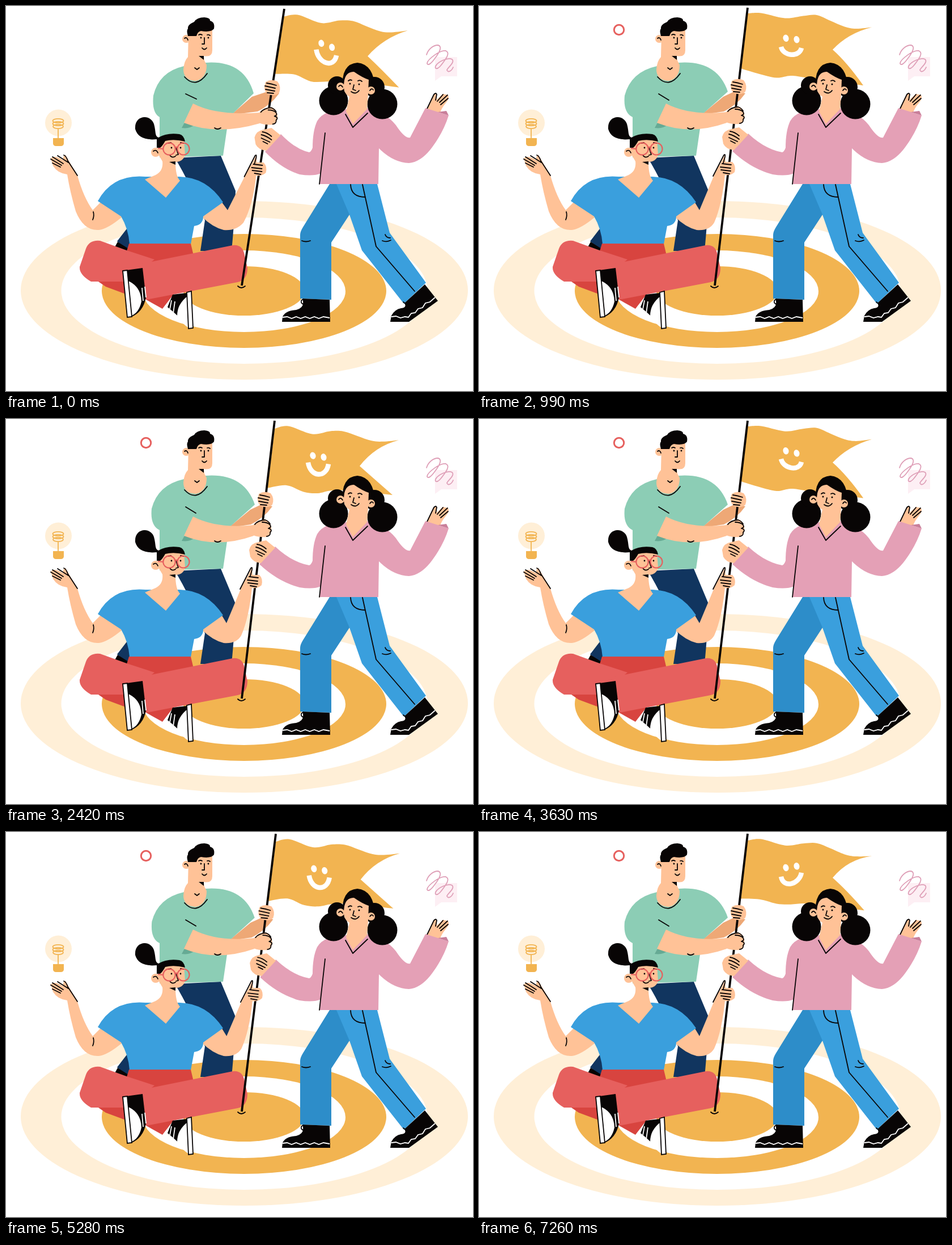
An HTML page for the animation above (7.37 s loop, 824x679 px).

```html
<!DOCTYPE html>
<html lang="en">
<head>
<meta charset="utf-8">
<title>Raising the flag</title>
<style>
html,body{margin:0;width:100%;height:100%;overflow:hidden;background:#fff}
svg{display:block;width:824px;height:679px}
.skin{fill:#ffc297}.tan{fill:#eea876}.gold{fill:#f2b451}.cream{fill:#ffefd7}
.green{fill:#8ccdb5}.navy{fill:#11355f}.blue{fill:#3a9fdd}.deep{fill:#2d8dc9}
.red{fill:#e6605e}.dark{fill:#d8443f}.pink{fill:#e4a0b6}.white{fill:#fff}.ink{fill:#080505}
.line{fill:none;stroke:#080505;stroke-width:1.8;stroke-linecap:round;stroke-linejoin:round}
.chalk{fill:none;stroke:#fff;stroke-width:1.8}
.rim{fill:none;stroke:#e6605e;stroke-width:2.2}
.wire{fill:none;stroke:#f2b451;stroke-width:1.8}
</style>
</head>
<body>
<svg viewBox="0 0 824 679">
  <!-- target -->
  <ellipse class="cream" cx="420.500" cy="501.500" rx="394.500" ry="157.500"/>
  <ellipse class="white" cx="420.500" cy="502" rx="323" ry="129"/>
  <ellipse class="gold" cx="420" cy="502.500" rx="251" ry="100.500"/>
  <ellipse class="white" cx="420" cy="503" rx="179" ry="72"/>
  <ellipse class="gold" cx="420" cy="502.500" rx="107" ry="43.500"/>

  <!-- bulb, ring, scribble -->
  <circle class="cream" cx="92.500" cy="206" r="23.500"/>
  <path class="gold" d="M83 233H102V243Q101 247 97 247H88Q84 247 83 243Z"/>
  <g class="wire">
    <ellipse cx="92" cy="202.500" rx="9.500" ry="3.600"/>
    <ellipse cx="92" cy="207.500" rx="9.500" ry="3.600"/>
    <ellipse cx="92" cy="212.500" rx="9" ry="3.600"/>
    <path d="M92 216V233"/>
  </g>
  <circle id="ring" cx="247" cy="42" r="8.700" fill="none" stroke="#e6605e" stroke-width="3"/>
  <path fill="#fdeff4" d="M757 90H796V124H768L757 132Z"/>
  <path fill="none" stroke="#dfa0b8" stroke-width="1.800" stroke-linecap="round" d="M742 86C745 76 754 69 762 69C771 71 764 83 757 92C750 102 744 106 743 101C744 94 766 77 776 79C785 83 775 95 768 104C762 112 756 112 758 106C762 98 780 90 787 94C793 99 779 109 778 113C780 118 786 115 789 108"/>

  <!-- standing man -->
  <path class="navy" d="M298 268L379 264L405 326Q404 370 398 432H343L351 378Q325 312 298 268ZM213 393L196 415L214 430L225 405Z"/>
  <path class="ink" d="M197 416L192 425L214 432L216 428Z"/>
  <path id="farArm" class="tan"/>
  <path id="tee" class="green"/>
  <path class="skin" d="M322 48L321 90Q314 97 313 112Q313 131 335 132Q354 128 354 104L350 96L349 88Q364 91 364 78V42L340 38Z"/>
  <circle class="skin" cx="318" cy="58" r="7"/>
  <path class="ink" d="M321 53Q318 43 321 40Q320 33 332 28Q337 20 350 20Q361 21 360 26Q369 28 367 40Q362 47 344 44Q338 45 336 53ZM340 88H349V95Z"/>
  <path class="line" d="M315 57Q319 54 321 60M350 56V67H346M346 74Q350 79 354 74M340 51Q343 49 346 51M355 51Q358 50 360 52M333 109L337 112L341 109M315 125Q335 147 355 119"/>
  <circle class="ink" cx="344" cy="56" r="1.400"/><circle class="ink" cx="357" cy="56" r="1.400"/>
  <path fill="#66aa94" d="M316 204L332 210Q324 217 310 215Z"/>
  <path id="nearArm" class="skin"/>
  <path id="crease" class="line"/>

  <g id="mast">
    <path id="flag" class="gold"/>
    <g class="white"><ellipse id="eyeL" rx="5" ry="6.300"/><ellipse id="eyeR" rx="5" ry="6.300"/></g>
    <path id="grin" fill="none" stroke="#fff" stroke-width="8.500"/>
  </g>

  <!-- sitting woman -->
  <path class="skin" d="M108 297Q91 295 83 282L79 269Q85 262 101 272Q100 263 105 263L126 299Q137 338 153 360L168 345L206 371Q180 393 164 395Q137 397 123 362Q113 328 108 297Z"/>
  <path class="line" d="M102 263Q106 264 109 273L126 299M79 270L98 281M82 266L101 278M91 264L110 276M82 277L96 284M154 363Q156 370 153 377"/>
  <path id="sitArm" class="skin"/>
  <path class="blue" d="M246 301Q188 296 162 344L203 371Q216 393 218 420H326L332 388Q348 386 348 371L383 346Q354 302 306 301Z"/>
  <path class="skin" d="M270 245L269 262L276 274Q278 291 264 298L245 306L282 338L307 308Q299 300 299 275Q312 275 316 263L314 236L284 230Z"/>
  <path class="ink" d="M266 250V235Q234 238 228 217C226 192 255 190 261 208C265 222 262 229 269 232Q284 223 306 226Q314 228 316 239Q296 234 281 238Q276 247 272 250ZM288 275L299 274V280Z"/>
  <circle class="skin" cx="264" cy="258" r="8"/>
  <path class="line" d="M260 256Q265 252 268 259M300 250L304 262L300 263M289 263Q293 269 299 265M286 242L291 241M308 241L313 242"/>
  <g class="rim"><circle cx="288" cy="252" r="10.700"/><circle cx="313" cy="252" r="10.500"/><path d="M298 250Q301 248 303 250M277 252L268 251"/></g>
  <circle class="ink" cx="292" cy="250" r="1.400"/><circle class="ink" cx="308" cy="250" r="1.400"/>
  <path class="dark" d="M217 419H326L331 440L258 452L213 432ZM160 484H215L211 508L176 495ZM242 515L296 508L276 534Z"/>
  <path class="red" d="M213 431L262 447L212 486H150Q129 474 130 460L141 428Q147 412 166 414Z"/>
  <path class="red" d="M236 455L400 422Q418 420 421 440L426 462Q426 483 409 487L247 518Z"/>
  <path class="ink" d="M212 466L241 462L247 514Q242 540 220 549Z"/>
  <path class="white" d="M216 485Q238 495 239 521Q235 540 222 546Z"/>
  <path class="white" stroke="#080505" stroke-width="1.800" d="M206 467L214 466L222 548L214 549Z"/>
  <path class="chalk" d="M240 497L242 520M245 495L247 514"/>
  <path class="ink" d="M294 509L319 506L323 567Q304 546 285 531Z"/>
  <path class="white" d="M320 512Q302 526 302 546Q312 562 323 568Z"/>
  <path class="white" stroke="#080505" stroke-width="1.800" d="M319 505L327 503L330 568L322 569Z"/>
  <path class="chalk" d="M292 519L289 535M298 521L295 542"/>

  <!-- woman in pink -->
  <path class="deep" d="M571 314H592L608 365L574 417V518L519 516V404Q519 398 524 390Z"/>
  <path class="blue" d="M583 314H655L677 400L741 488L702 525L628 431L606 368Z"/>
  <path class="line" d="M608 315Q609 337 634 337M629 315L653 424L721 503M522 414Q529 417 537 414M664 414Q672 417 679 413M669 403Q671 409 678 409"/>
  <path class="ink" d="M523 516L571 518L572 557H487L488 548Q493 537 512 536Q528 532 523 516Z"/>
  <path class="ink" d="M703 524L739 491L762 520L711 557H678L680 546Q686 535 697 533Q708 532 703 524Z"/>
  <path class="chalk" d="M488 549L496 548L504 551L512 548L520 551L528 548L536 551L544 548L552 551L560 548L571 550M680 548L688 547L696 550L704 548L710 549L715 542L722 541L727 534L735 532L740 524L748 522L757 514"/>
  <path class="line" d="M526 518Q520 517 521 523Q524 528 527 523M706 526L701 522"/>
  <path class="skin" d="M741 184L756 155Q761 152 760 165L771 155L780 157Q783 163 776 171Q768 181 766 188Z"/>
  <path class="line" d="M743 181L755 156Q759 152 760 156L758 166M761 168L771 156M765 170L779 157M767 174L780 163"/>
  <path id="pinkArm" class="pink"/>
  <path class="pink" d="M603 182Q561 182 549 203Q541 220 541 250L556 292L553 314H657L658 251Q683 276 711 277Q733 275 752 249Q772 222 781 193L740 180L713 232Q705 234 692 216Q676 190 637 180Z"/>
  <path fill="#c97f9a" d="M762 187L777 185L781 193Z"/>
  <path class="line" d="M563 224L553 314"/>
  <g class="ink">
    <circle cx="578" cy="167" r="25.500"/><circle cx="584" cy="140" r="16"/>
    <circle cx="664" cy="173" r="26.500"/><circle cx="650" cy="143" r="18"/>
    <path d="M594 145Q591 102 620 100Q649 103 651 145Z"/>
  </g>
  <path class="skin" d="M597 131Q600 116 614 116Q630 127 640 130L639 156L637 182L612 208L600 186L606 160Q595 154 596 139Z"/>
  <circle class="skin" cx="590" cy="142" r="7"/><circle class="skin" cx="644" cy="149" r="7"/>
  <path class="line" d="M599 191L612 214L638 189M587 142Q590 137 594 143M642 149Q645 144 648 148M614 139L612 147L617 149M609 151Q617 157 623 149M604 132Q607 129 610 131M621 132Q625 130 628 133"/>
  <circle class="ink" cx="607" cy="137" r="1.500"/><circle class="ink" cx="623" cy="138" r="1.500"/>

  <!-- pole and hands -->
  <path class="line" d="M409 494Q415 500 422 494"/>
  <path id="pole" fill="none" stroke="#080505" stroke-width="3.800"/>
  <g id="hand1">
    <path class="skin" d="M446 132Q456 126 467 131Q474 140 470 151Q463 158 451 154Q443 149 444 140Z"/>
    <path class="line" d="M448 134Q456 135 465 138M445 139L463 143M446 145L462 148M449 151L460 152"/>
  </g>
  <g id="hand2">
    <path class="skin" d="M436 187Q443 178 458 177Q466 180 468 190Q470 204 460 208Q447 209 436 205Z"/>
    <path class="line" d="M439 186Q444 179 457 178Q463 180 466 185M452 182Q462 182 466 187Q469 191 463 193M463 193Q471 195 466 200M466 200Q467 206 460 207"/>
  </g>
  <g id="hand3">
    <path class="skin" d="M429 231Q432 219 445 217L459 214L475 227L450 254Q436 253 431 243Z"/>
    <path class="line" d="M443 221Q451 222 459 229M441 226Q450 228 459 235M441 232L456 239M444 238L452 242"/>
  </g>
  <g id="hand4">
    <path class="skin" d="M424 282L434 262L435 275L447 275Q454 282 451 293Q443 301 428 297Z"/>
    <path class="line" d="M413 300L432 263Q435 260 434 266L431 277M429 278L445 280M426 284L444 286M427 289L444 291M431 294L442 296"/>
  </g>
</svg>
<script>
const LOOP = 7370, STEP = 110, WAVE = 2805;
const el = id => document.getElementById(id);
const set = (id, attrs) => { for (const n in attrs) el(id).setAttribute(n, attrs[n]); };
const clamp = v => Math.min(1, Math.max(0, v));
const ease = (t, a, b) => { const p = clamp((t - a) / (b - a)); return p * p * (3 - 2 * p); };

// edge points: x, y, then how far y follows cos and sin of the wave
const TOP = [[474,15,-2,0],[498,12.5,0,0],[540,24,-2.5,0],[572,19.5,-2,1],[596,19,-3,1],[620,28,-2,1],[645,37.5,-1,2],[665,40,0,3],[693,37.5,0,5]];
const BOTTOM = [[680,137,3,1],[645,133,3,1],[610,129,3,0],[575,126,0,0],[550,127,-4,1],[525,127.5,-1,-1],[495,118.5,1.5,0],[461.5,116,-6,2]];
const NOTCH = [624,80,-3,1];

// smooth curve through the points, without the leading move
function curve(pts) {
  let d = '';
  for (let i = 0; i < pts.length - 1; i++) {
    const p = pts[i], q = pts[i + 1], o = pts[i - 1] || p, r = pts[i + 2] || q;
    d += `C${p[0] + (q[0] - o[0]) / 6} ${p[1] + (q[1] - o[1]) / 6} ${q[0] - (r[0] - p[0]) / 6} ${q[1] - (r[1] - p[1]) / 6} ${q[0]} ${q[1]}`;
  }
  return d;
}

function drawFlag(t) {
  const a = 2 * Math.PI * (t - 990) / WAVE, c = Math.cos(a), s = Math.sin(a);
  const move = ([x, y, u, v]) => [x, y + u * c + v * s];
  const top = TOP.map(move), low = BOTTOM.map(move), notch = move(NOTCH);
  low[0][0] -= 2 * c;
  set('flag', {d: `M${top[0]}${curve(top)}Q651 48 ${notch}Q649 ${notch[1] + 22} ${low[0]}${curve(low)}Z`});

  const eyeY = 62 - 4 * c, slope = 1.2 - 2.5 * s;
  set('eyeL', {transform: `translate(541.5 ${eyeY - slope}) rotate(-15)`});
  set('eyeR', {transform: `translate(560.5 ${eyeY + slope}) rotate(-15)`});
  const y = 75.5 - 2.5 * c, lean = 1 - 4.5 * s, sag = 21.5 - 4.5 * c;
  set('grin', {d: `M533 ${y - lean}C537 ${y - lean + sag} 565 ${y + lean + sag} 569 ${y + lean}`});
}

// k = 0 is the upright pole, k = 1 the starting lean
function drawPose(k) {
  set('mast', {transform: `rotate(${1.98 * k} 416 493)`});
  set('pole', {d: `M416 493L${474 + 17 * k} ${3 + 2 * k}`});
  [[12, 2], [10.6, 1.3], [9.5, 1], [7.5, 1]].forEach(([x, y], i) =>
    set('hand' + (i + 1), {transform: `translate(${x * k} ${y * k})`}));

  const near = 10.6 * k, far = 12 * k, sit = 7.5 * k, pull = 10 * k;
  set('tee', {d: `M314 106Q${268 + 2 * k} 116 ${257 + 3 * k} 158Q${254 + 3 * k} 188 271 196V267L383 264L390 216L${394 + 5 * k} 191L${439 - 2 * k} ${151 + 3 * k}Q420 95 352 100Z`});
  set('farArm', {d: `M${392 + 5 * k} 192L${431 + 3 * k} 160L${452 + far} 150L${470 + far} 154Q${456 + far} 174 ${432 + far} 186Z`});
  set('nearArm', {d: `M330 172Q372 194 ${437 + near} ${187 + k}V${206 + k}Q372 229 314 206Z`});
  set('crease', {d: `M317 155L${335 + k} ${166 - 2 * k}M368 215Q373 219 379 215`});
  set('sitArm', {d: `M380 345L${389 + 2 * k} 360L${415 + sit} 298L${424 + sit} 280L${434 + sit} 297Q${429 + sit} 350 ${415 + 4 * k} 382Q406 397 384 395Q364 390 345 371Z`});
  set('pinkArm', {d: `M${475 + pull} ${225 + k}Q${505 + 6 * k} 253 535 258Q541 256 543 240L570 250L556 295Q542 301 518 297Q${480 + 6 * k} 287 ${447 + pull} ${256 + k}Z`});
}

function lean(t) {
  const start = 1 - Math.pow(clamp(t / 990), 1.5);
  return start + .12 * (ease(t, 3740, 4620) - ease(t, 6600, 7150));
}

function frame(now) {
  const t = Math.floor(now % LOOP / STEP) * STEP;
  drawPose(lean(t));
  drawFlag(t);
  set('ring', {transform: `translate(247 42) scale(${ease(t, 330, 770)}) translate(-247 -42)`});
}

const began = performance.now();
function tick() {
  frame(performance.now() - began);
  requestAnimationFrame(tick);
}
tick();
</script>
</body>
</html>
```
